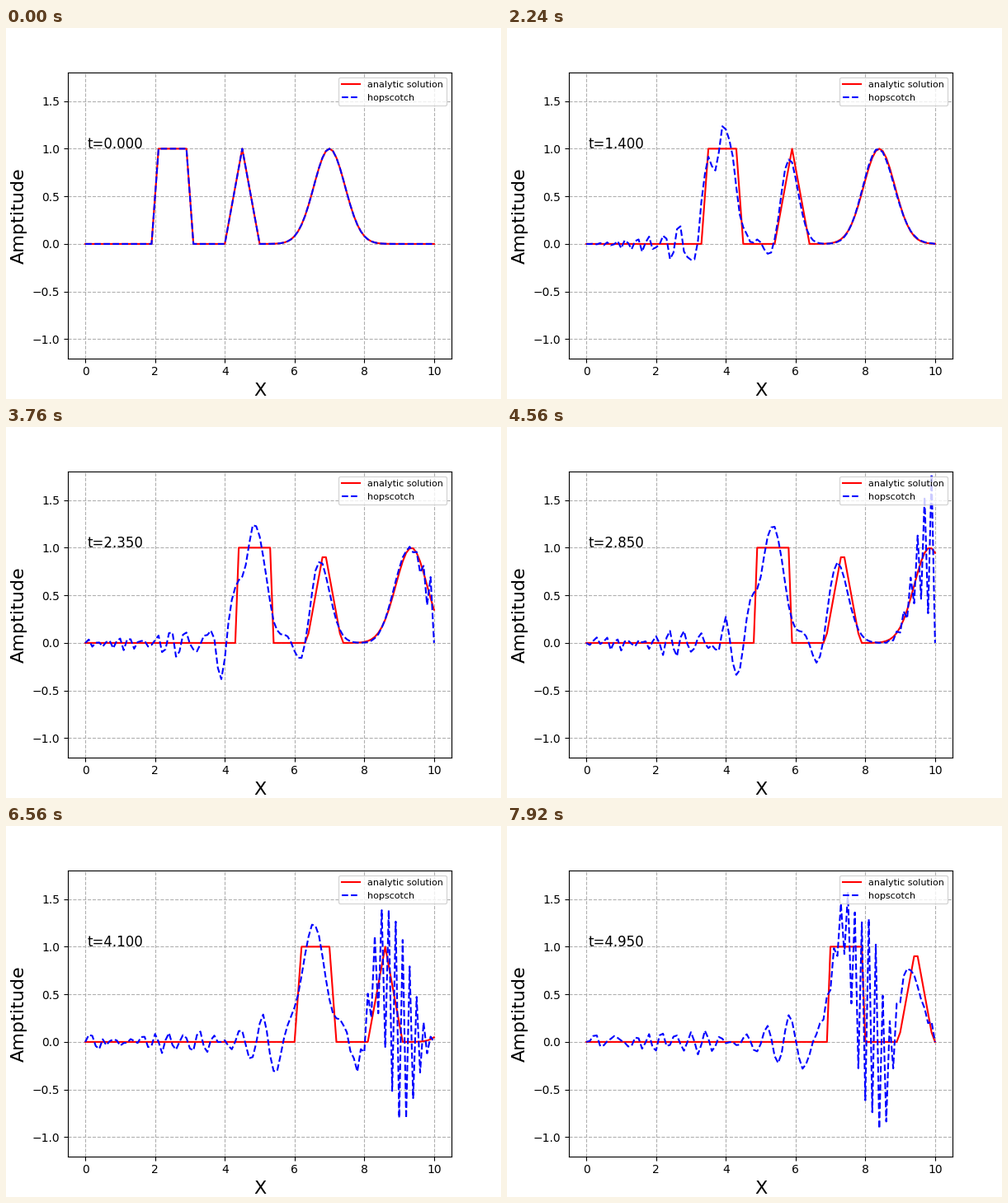
Recreate the animation shown at these times as a matplotlib script. Size 600 by 450 pixels, loop 8 s.

```python
import numpy as np
import matplotlib.pyplot as plt
from matplotlib.animation import FuncAnimation

SPEED = 1.0
DX, DT = 0.1, 0.05
STEPS = 100
INTERVAL = 80

x = np.linspace(0, 10, 101)
index = np.arange(x.size)


def profile(s):
    """Square pulse, triangle and Gaussian side by side."""
    square = np.heaviside(s - 2, 0.5) - np.heaviside(s - 3, 0.5)
    triangle = np.clip(1 - 2 * np.abs(s - 4.5), 0, None)
    gaussian = np.exp(-2.5 * (s - 7) ** 2)
    return square + triangle + gaussian


def hopscotch_step(u, n):
    """Explicit sweep on one parity, then implicit sweep on the other."""
    r = SPEED * DT / (2 * DX)
    u = u.copy()
    u[[0, -1]] = 0
    inner = index[1:-1]
    for parity in (0, 1):
        j = inner[(inner + n) % 2 == parity]
        u[j] -= r * (u[j + 1] - u[j - 1])
    return u


def solve():
    history = [profile(x)]
    for n in range(STEPS - 1):
        history.append(hopscotch_step(history[-1], n))
    return history


history = solve()

plt.rcParams["font.family"] = "DejaVu Sans"
fig, ax = plt.subplots(figsize=(6, 4.5), dpi=100)
exact_line, = ax.plot(x, history[0], "r-", lw=1.5, label="analytic solution")
scheme_line, = ax.plot(x, history[0], "b--", lw=1.5, label="hopscotch")
clock = ax.text(0.05, 1.0, "", fontsize=12)

ax.set_xlim(-0.5, 10.5)
ax.set_ylim(-1.2, 1.8)
ax.set_xlabel("X", fontsize=16)
ax.set_ylabel("Amptitude", fontsize=16)
ax.grid(linestyle="--")
ax.legend(loc="upper right", fontsize=8)


def update(n):
    t = n * DT
    exact_line.set_ydata(profile(x - SPEED * t))
    scheme_line.set_ydata(history[n])
    clock.set_text(f"t={t:.3f}")
    return exact_line, scheme_line, clock


anim = FuncAnimation(fig, update, frames=STEPS, interval=INTERVAL,
                     repeat=True, repeat_delay=0)
plt.show()
```
